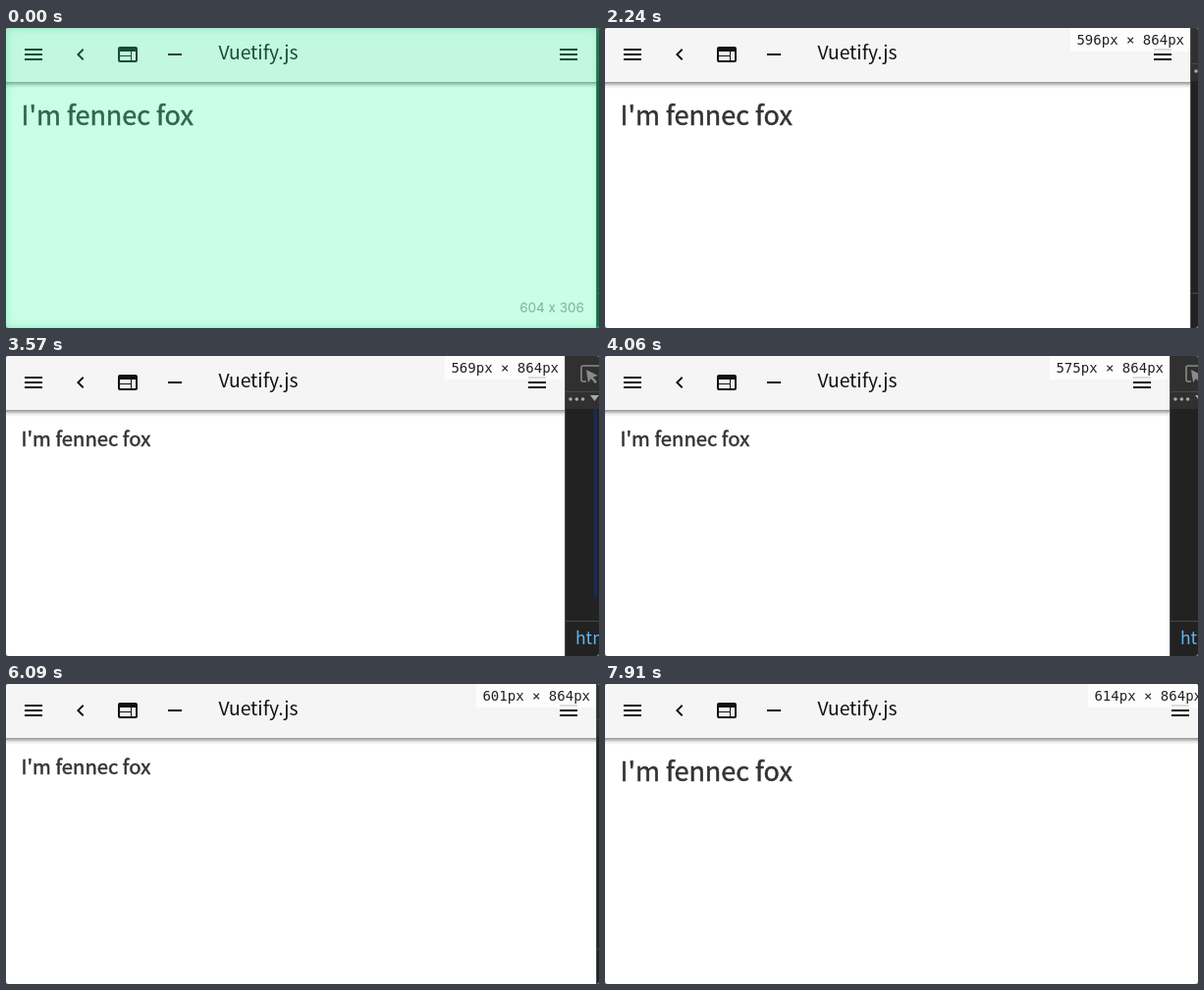
Animation of 604x306 px, one loop 8 s. Source, as an HTML page:

```html
<!DOCTYPE html>
<html lang="en">
<head>
<meta charset="utf-8">
<title>Responsive heading</title>
<style>
  html, body { margin: 0; width: 100%; height: 100%; overflow: hidden; background: #777; }
  #stage { position: relative; width: 604px; height: 306px; overflow: hidden; border-radius: 3px; background: #fff; }
  svg { display: block; }
  text { font-family: "Noto Sans CJK KR", "Noto Sans CJK JP", "Noto Sans CJK SC", "Noto Sans", sans-serif; white-space: pre; }
  #heading { fill: #333; stroke: #333; stroke-width: .5px; }
  #size text { font: 14px "DejaVu Sans Mono", monospace; fill: #222; }
  #flash { position: absolute; inset: 0; background: rgba(40, 255, 155, .25); box-shadow: inset 0 0 9px rgba(0, 190, 120, .3); }
  #flash span { position: absolute; right: 15px; top: 276px; font: 13.5px/18px Inter, sans-serif; color: rgba(40, 80, 60, .45); }
</style>
</head>
<body>
<div id="stage">
  <svg width="604" height="306" viewBox="0 0 604 306">
    <defs>
      <linearGradient id="shade" x1="0" y1="0" x2="0" y2="1">
        <stop offset="0" stop-opacity=".42"/>
        <stop offset=".3" stop-opacity=".26"/>
        <stop offset=".6" stop-opacity=".08"/>
        <stop offset="1" stop-opacity="0"/>
      </linearGradient>
      <path id="menu" d="M3 18h18v-2H3zm0-5h18v-2H3zm0-7v2h18V6z"/>
    </defs>

    <rect width="604" height="55" fill="#f5f5f5"/>
    <rect y="55" width="604" height="7" fill="url(#shade)"/>
    <g fill="#111">
      <use href="#menu" x="16" y="15"/>
      <path transform="translate(64 15)" d="M15.4 7.4 14 6l-6 6 6 6 1.4-1.4-4.6-4.6z"/>
      <path transform="translate(112 15)" fill-rule="evenodd"
            d="M4 4h16a2 2 0 0 1 2 2v12a2 2 0 0 1-2 2H4a2 2 0 0 1-2-2V6a2 2 0 0 1 2-2zM4 9v4h11V9zM4 14v4h11v-4zM16 9v9h4V9z"/>
      <path d="M165 26h14v2h-14z"/>
      <text x="216.5" y="32" font-size="19.3">Vuetify.js</text>
    </g>
    <text id="heading" x="15.5">I'm fennec fox</text>

    <!-- everything here hangs on the right edge of the page -->
    <g id="edge">
      <use href="#menu" x="-40" y="15" fill="#111"/>
      <g id="size">
        <rect x="-122" width="122" height="24" fill="#fff" fill-opacity=".85"/>
        <text x="-6" y="17" text-anchor="end"></text>
      </g>
      <rect width="60" height="306" fill="#222"/>
      <rect width="60" height="54" fill="#303030"/>
      <path d="M0 36.5h60M0 270.5h60" stroke="#484848"/>
      <path d="M.5 0v306" stroke="#4c4c4c"/>
      <path d="M22 26h-3a2 2 0 0 1-2-2V12a2 2 0 0 1 2-2h18" fill="none" stroke="#8a8a8a" stroke-width="1.6"/>
      <path d="M22 14l12 6-5 1.500 4 5-2 1.500-4-5-3 4z" fill="#8a8a8a"/>
      <g fill="#a8a8a8">
        <circle cx="6" cy="44" r="1.800"/>
        <circle cx="12.300" cy="44" r="1.800"/>
        <circle cx="18.600" cy="44" r="1.800"/>
        <path d="M26 40h9l-4.500 6z"/>
      </g>
      <path d="M31.500 54v192" stroke="#1a2b55" stroke-width="3"/>
      <text x="11" y="294" font-size="17.500" fill="#62b5ea">html</text>
    </g>
  </svg>
  <div id="flash"><span>604 x 306</span></div>
</div>
<script>
  const LOOP = 8000, STEP = 70;
  const [heading, edge, size, flash] = ['heading', 'edge', 'size', 'flash'].map(id => document.getElementById(id));
  const sizeText = size.querySelector('text');

  // [ms, page width]
  const drag = [
    [0, 601], [2100, 601], [2450, 588], [2870, 571], [3290, 567], [3430, 567],
    [4060, 575], [5180, 592], [5390, 594], [5530, 594], [6090, 601],
    [6370, 605], [7000, 611], [7630, 611], [7910, 614], [LOOP, 614]
  ];

  function widthAt(t) {
    const i = drag.findIndex(p => p[0] > t);
    const [t0, w0] = drag[i - 1], [t1, w1] = drag[i];
    return Math.round(w0 + (w1 - w0) * (t - t0) / (t1 - t0));
  }

  function draw(now) {
    const t = Math.floor(now % LOOP / STEP) * STEP;
    const w = widthAt(t);
    const small = t >= 2450 && t < 6580;
    heading.setAttribute('font-size', small ? 20.3 : 27);
    heading.setAttribute('y', small ? 92 : 99);
    edge.setAttribute('transform', `translate(${w} 0)`);
    size.style.display = t >= 2170 ? '' : 'none';
    sizeText.textContent = `${w}px × 864px`;
    flash.style.opacity = Math.max(0, 1 - t / (4 * STEP));
    requestAnimationFrame(draw);
  }
  requestAnimationFrame(draw);
</script>
</body>
</html>
```
